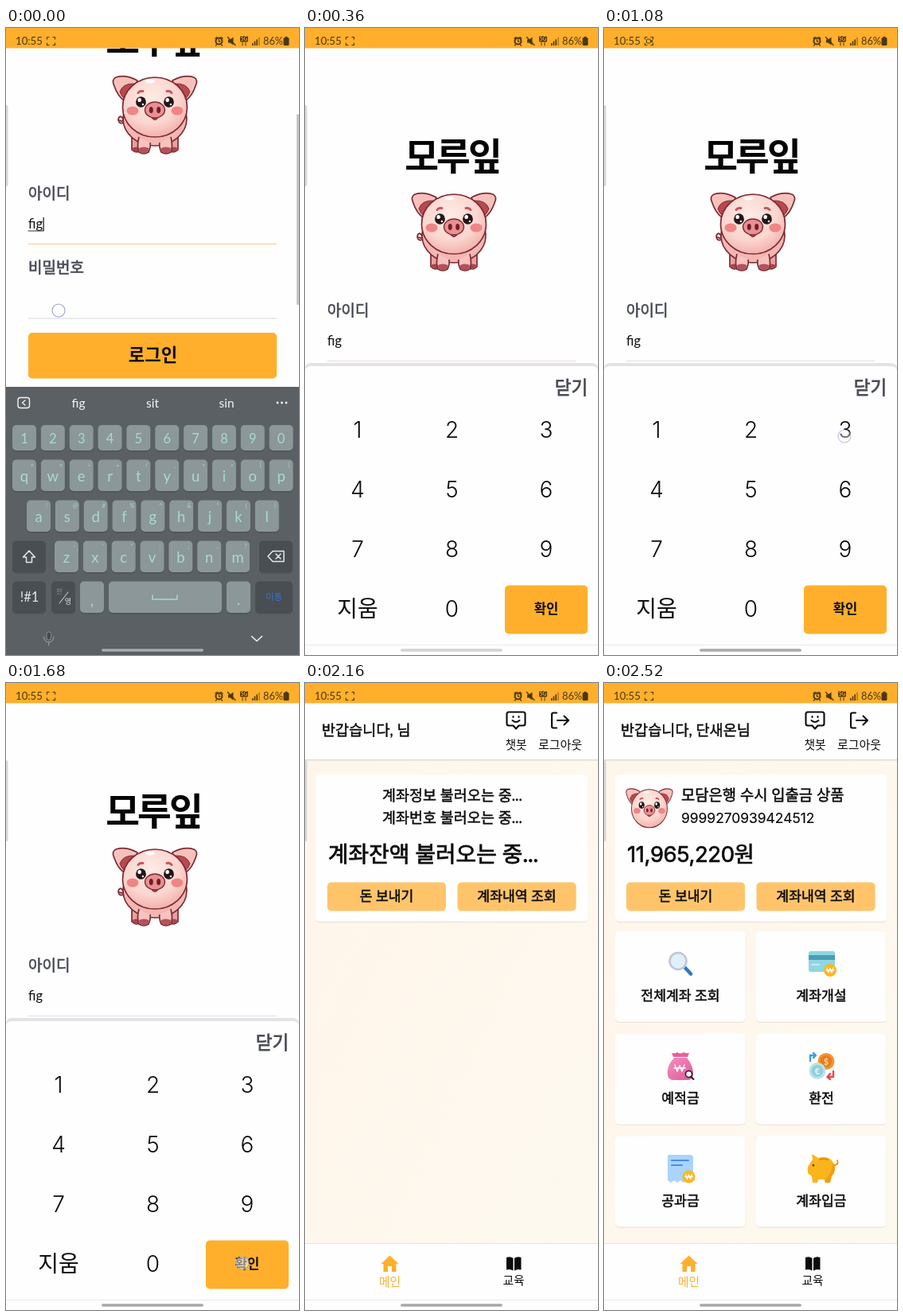
An HTML page for the animation above (2.64 s loop, 368 by 788 pixels).

```html
<!DOCTYPE html>
<html lang="ko">
<head>
<meta charset="utf-8">
<title>로그인</title>
<style>
html, body { margin: 0; width: 100%; height: 100%; overflow: hidden; background: #fefefe; }
svg { display: block; position: fixed; left: 0; top: 0; width: 368px; height: 788px; }
text { font-family: Lato, 'Noto Sans CJK KR', 'Noto Sans CJK JP', 'Noto Sans CJK', sans-serif; white-space: pre; }
.num { font-family: Inter, 'Noto Sans CJK KR', 'Noto Sans CJK JP', 'Noto Sans CJK', sans-serif; }
</style>
</head>
<body>
<svg id="stage" viewBox="0 0 368 788" xmlns="http://www.w3.org/2000/svg"></svg>
<script>
const ORANGE = '#ffaf2b', INK = '#0c0c0e', SLATE = '#4a4d57', MINT = '#a9d9d1';
const STEP = 120, COUNT = 22;

// Drawing helpers that return markup
const attrs = o => Object.entries(o).map(([k, v]) => ` ${k}="${v}"`).join('');
const el = (tag, o, body = '') => `<${tag}${attrs(o)}>${body}</${tag}>`;
const group = (id, body) => el('g', { id }, body);
const rect = (x, y, w, h, fill, rx = 0, o = {}) => el('rect', { x, y, width: w, height: h, rx, fill, ...o });
const oval = (cx, cy, rx, ry, fill, o = {}) => el('ellipse', { cx, cy, rx, ry, fill, ...o });
const path = (d, fill, o = {}) => el('path', { d, fill, ...o });
const line = (d, stroke, w = 1.5, o = {}) => path(d, 'none',
  { stroke, 'stroke-width': w, 'stroke-linecap': 'round', 'stroke-linejoin': 'round', ...o });
// y is the optical middle of the text
const text = (x, y, s, size, fill = INK, o = {}) => el('text',
  { x, y: y + size * 0.375, 'font-size': size, fill, 'text-anchor': 'middle', ...o }, s);
const left = { 'text-anchor': 'start' };
const bold = { 'font-weight': 700 };
const light = { 'font-weight': 300, class: 'num' };
const medium = (w = 0.45, c = INK) => ({ stroke: c, 'stroke-width': w });
const mirror = s => s + el('g', { transform: 'matrix(-1 0 0 1 374 0)' }, s);
const EDGE = { stroke: '#7c2a33', 'stroke-width': 1.7, 'stroke-linejoin': 'round' };

function pigFace() {
  const ear = path('M165 213Q150 205 138 209Q132 212 136 220Q140 232 148 238L160 228Z', '#f7c1bb', EDGE) +
    path('M162 217Q147 216 143 227Q145 233 149 236L162 226Z', '#b9484f', { ...EDGE, 'stroke-width': 1 });
  return mirror(ear) +
    oval(187, 246.5, 40.5, 37.5, 'url(#skin)', EDGE) +
    oval(181, 214, 6, 2.6, '#fff', { opacity: 0.85 }) +
    mirror(oval(159, 251, 7.5, 5.5, '#f08585') + line('M166 228.5Q168 225.5 172 226.5', '#c9555b', 3)) +
    [169.5, 204.5].map(x => oval(x, 240, 6.4, 6.8, '#241518') +
      oval(x - 1.8, 237.5, 2.3, 2.6, '#fff') + oval(x + 2.4, 243, 1.2, 1.2, '#fff')).join('') +
    path('M182 259Q187 266 192 259Z', '#b8434c', { stroke: '#7c2a33' }) +
    oval(187, 250, 12.5, 10, '#ea9093', { ...EDGE, 'stroke-width': 1.4 }) +
    mirror(oval(182.3, 250, 2.5, 4, '#6e2029'));
}

function pig() {
  const back = path('M158 282V300Q163 305 169 301V284Z', '#e9a19f', EDGE) +
    path('M158.5 298Q163 295 168.5 298V301Q163 304.5 158.5 300Z', '#a8474d');
  const front = path('M167 284Q164 296 167 303Q173 307 179 303Q182 297 181 291', '#f7c3be', EDGE) +
    path('M167 298Q173 295 179.5 298Q180 301 178.5 302.5Q173 306 167.5 302.5Z', '#b3525a');
  return line('M151 264Q142 270 141 262Q143 255 147 261Q147 266 143 263', '#7c2a33', 1.8) +
    mirror(back) + oval(187, 261, 40, 34, '#f4b6b2', EDGE) + mirror(front) + pigFace();
}

function login() {
  const label = { ...left, ...medium(0.7, SLATE) };
  return text(185, 161, '모루잎', 46.5, '#050505', { ...bold, 'letter-spacing': -3 }) + pig() +
    text(28, 355, '아이디', 19, SLATE, label) +
    text(28, 393, 'fig', 16.5, INK, left) +
    rect(28, 418, 312, 1, '#ddd', 0, { id: 'idLine' }) +
    text(28, 448, '비밀번호', 19, SLATE, label) +
    rect(28, 511.5, 312, 1, '#d3d9df') +
    rect(28, 530, 312, 57.5, ORANGE, 5) +
    text(184.5, 558, '로그인', 22.3, INK, bold);
}

function pad() {
  const keys = ['1', '2', '3', '4', '5', '6', '7', '8', '9', '지움', '0'];
  return path('M0 776V429Q0 421 8 421H360Q368 421 368 429V776Z', '#e3e3e7') +
    path('M0 776V431Q0 425 8 425H360Q368 425 368 431V776Z', '#fefefe') +
    text(355, 452, '닫기', 22.4, SLATE, { ...medium(0.8, SLATE), 'text-anchor': 'end' }) +
    keys.map((k, i) => text([66, 184.5, 303][i % 3], 504 + 75 * Math.floor(i / 3), k, 28, INK, light)).join('') +
    rect(251, 700.5, 104, 61, ORANGE, 5) + text(303, 730, '확인', 16.6, INK, bold);
}

function keyboard() {
  const W = '#f4f5f5';
  const key = (x, y, w, h, dark) => rect(x, y + 1.5, w, h, '#454b4e', 5, { opacity: 0.6 }) +
    rect(x, y, w, h, dark ? '#484e51' : '#8b9798', 5);
  const row = (chars, marks, x0, y, h) => [...chars].map((c, i) => {
    const x = x0 + i * 35.85, size = h > 35 ? 18.5 : 16.5;
    return key(x, y, 30, h) +
      el('text', { x: x + 15, y: y + h / 2 + size * 0.42, 'font-size': size, fill: MINT, 'text-anchor': 'middle' }, c) +
      (marks ? text(x + 25, y + 7, marks[i].replace('&', '&amp;').replace('<', '&lt;'), 7.5, MINT) : '');
  }).join('');
  const sparkle = (x, y, r) => path(`M${x} ${y - r}Q${x} ${y} ${x + r} ${y}Q${x} ${y} ${x} ${y + r}Q${x} ${y} ${x - r} ${y}Q${x} ${y} ${x} ${y - r}Z`, W, { stroke: W });
  const words = rect(15, 464.5, 14.5, 13, 'none', 3, { stroke: W, 'stroke-width': 1.4 }) +
    line('M24 468L20.5 471L24 474', W, 1.4) +
    ['fig', 'sit', 'sin'].map((s, i) => text(91 + 93 * i, 471, s, 15.5, W)).join('');
  const tools = sparkle(33, 469, 5) + sparkle(28, 474, 2.2) + sparkle(36, 475, 2.2) +
    oval(97, 470, 7, 7, 'none', { stroke: W, 'stroke-width': 1.4 }) +
    line('M94.5 468V468.3M99.5 468V468.3M93.5 472Q97 476 100.5 472', W, 1.4) +
    rect(157.5, 463.5, 11, 10, 'none', 2, { stroke: W, 'stroke-width': 1.3 }) +
    line('M155 467V475Q155 477 157 477H165', W, 1.3) + text(163, 468.5, 'A', 8, W, bold) +
    rect(221, 464, 12, 13, 'none', 2, { stroke: W, 'stroke-width': 1.4 }) + rect(224, 463, 6, 4, W, 1) +
    oval(292, 470, 6, 6, 'none', { stroke: W, 'stroke-width': 2, 'stroke-dasharray': '3.2 1.5' }) +
    oval(292, 470, 5, 5, 'none', { stroke: W }) + oval(292, 470, 2, 2, 'none', { stroke: W, 'stroke-width': 1.2 });
  return rect(0, 451, 368, 440, '#5a6063') +
    group('words', words) + group('tools', tools) +
    [341, 346.5, 352].map(x => oval(x, 471, 1.4, 1.4, W)).join('') +
    row('1234567890', '', 8, 499, 32) +
    row('qwertyuiop', '+×÷=/_<>[]', 8, 542.5, 39.5) +
    row('asdfghjkl', '!@#%^&*()', 26, 593.5, 39.5) +
    row('zxcvbnm', '-\'":;,?', 61, 644.5, 39.5) +
    key(8, 644.5, 42, 39.5, 1) + line('M29 657L36.5 665H32.5V671.5H25.5V665H21.5Z', '#e4e9e9', 1.5) +
    key(318, 644.5, 42, 39.5, 1) + line('M329 664L335 657.5H349V670.5H335ZM339 661L345 667M345 661L339 667', '#e4e9e9', 1.5) +
    key(8, 695.5, 42, 39.5, 1) + text(29.5, 715, '!#1', 16.5, '#e4e9e9') +
    key(57, 695.5, 30, 39.5, 1) + text(67, 708, '한', 8.5, '#899293') +
    line('M67 723L78 709', '#dfe5e5', 1) + text(78, 721, '영', 9, '#dfe5e5') +
    key(93, 695.5, 30, 39.5) + text(108, 719, ',', 19, MINT) +
    key(129, 695.5, 142, 39.5) + line('M184 713V718H215V713', MINT, 1.5) +
    key(277, 695.5, 30, 39.5) + text(292, 718, '.', 19, MINT) +
    key(313, 695.5, 47, 39.5, 1) + text(336.5, 715, '이동', 11.5, '#3f72c4') +
    rect(51, 759, 5.5, 10, '#42484b', 2.8, { stroke: '#9aa1a3', 'stroke-width': 0.8 }) +
    line('M47.5 765Q48 772 53.7 772T60 765M53.7 772V776', '#9aa1a3', 1) +
    line('M308.5 764.5L315 770.5L321.5 764.5', '#f2f3f3', 1.6);
}

const won = (x, y, s) => line(
  `M${x - s} ${y - s * 0.7}L${x - s / 2} ${y + s * 0.7}L${x} ${y - s * 0.6}L${x + s / 2} ${y + s * 0.7}L${x + s} ${y - s * 0.7}M${x - s * 1.2} ${y}H${x + s * 1.2}`, '#fff', 1.3);

function icons() {
  const coin = (x, y, r) => oval(x, y, r, r, '#f8b823') + won(x, y, r * 0.5);
  return line('M102 358L109 365.5', '#2f77c8', 4.5) +
    oval(93, 349.5, 10.5, 10.5, '#dff0fb', { stroke: '#bfc6d6', 'stroke-width': 2.6 }) +
    // card
    rect(257, 337, 33, 26, '#8fd6e2', 2.5) + rect(257, 342, 33, 6, '#4a9db4') +
    line('M261 354H270', '#d9f3f7', 1.6) + coin(284, 361, 8) +
    // money bag
    path('M88 471Q78 482 80 493Q81 499 88 499H104Q111 499 112 493Q113 482 104 471Z', 'url(#bag)') +
    path('M87 470L85 465Q90 466 92 464Q96 467 100 464Q103 466 107 465L105 470Z', '#e85f9b') +
    won(95, 484, 6) + oval(106.5, 491.5, 4, 4, '#fff', { stroke: '#222', 'stroke-width': 1.6 }) +
    line('M109.5 495L112.5 498', '#222', 2) +
    // exchange
    oval(279, 475.5, 10.5, 10.5, '#f39532') + oval(279, 475.5, 7.5, 7.5, '#e57d1c') +
    text(279, 475.5, '$', 11, '#ffd99b', bold) +
    oval(268, 487.5, 10.5, 10.5, '#b9e4ea') + oval(268, 487.5, 7.5, 7.5, '#93cfda') +
    text(268, 487.5, '€', 11, '#e6f8fa', bold) +
    line('M259 475V468H265M263 465L266 468L263 471', '#3d9fe0', 2.4) +
    line('M288 488V495H281M284 491L280.5 495L284 498', '#e5484d', 2.4) +
    // receipt
    path('M80 594Q80 593 82 593H108Q112 593 112 597V625L108 628L104 625L100 628L96 625L92 628L88 625L84 628L80 625Z', '#a9d4fb') +
    line('M85 600H106M85 606H98', '#4d8fe0', 2) + coin(106.5, 620.5, 8) +
    // piggy bank
    path('M262 599L261 592L269 597Q282 593 288 603Q293 613 285 620L284 628H278L277 624H269L268 628H262L261 620L256 616V608Q259 603 262 599Z', '#fbb41c') +
    path('M286 620L284 628H278L277 624Q284 621 288 603Q293 613 286 620Z', '#f29d12') +
    line('M289 606Q295 606 293 600', '#e8930c', 1.8) + oval(263, 606, 1.3, 1.6, '#5b3a08') +
    line('M271 599Q276 597 281 599', '#d98408', 1.6);
}

function home() {
  const card = (x, y, w, h) => rect(x, y + 1, w, h, '#e9dfd2', 5) + rect(x, y, w, h, '#fefefe', 5);
  const labels = ['전체계좌 조회', '계좌개설', '예적금', '환전', '공과금', '계좌입금'];
  const grid = labels.map((s, i) => {
    const x = 177 * (i % 2), y = 312 + 128.7 * Math.floor(i / 2);
    return card(14 + x, y, 163.5, 114) + text(96 + x, y + 81, s, 17.2, INK, medium(0.5));
  }).join('');
  const button = (x, s) => rect(x, 250.5, 149, 36, '#ffc46a', 5) + text(x + 74.5, 268, s, 17.2, INK, medium(0.5));
  const row = (y, s, size, w, o) => text(y > 200 ? 29 : 97, y, s, size, INK, { ...left, ...medium(w), ...o });
  const wait = row(141, '계좌정보 불러오는 중...', 18.5) + row(169, '계좌번호 불러오는 중...', 18.5) +
    row(215, '계좌잔액 불러오는 중...', 27.8, 0.8);
  const done = el('g', { transform: 'translate(-46.8 0) scale(.555 .64)' }, pigFace()) +
    row(141, '모담은행 수시 입출금 상품', 18.8) +
    row(169, '9999270939424512', 17.4, 0.2, { class: 'num' }) +
    row(215, '11,965,220원', 27.5, 0.7, { class: 'num', 'letter-spacing': -0.4 });
  return rect(0, 26, 368, 750, 'url(#cream)') +
    rect(0, 25, 368, 71, '#fefefe') + rect(0, 96, 368, 1.5, '#dfdcd8') +
    text(21, 59, '반갑습니다, 님', 18.6, INK, { ...left, ...medium(), id: 'hello' }) +
    line('M256 36.5H274Q276.5 36.5 276.5 39V51Q276.5 53.5 274 53.5H268.5L265 57.5L261.5 53.5H256Q253.5 53.5 253.5 51V39Q253.5 36.5 256 36.5Z', INK, 2.1) +
    line('M261.5 42V43M268.5 42V43M260.5 47Q265 51 269.5 47', INK, 2) +
    text(265, 77, '챗봇', 14.8) +
    line('M316 37.5H312Q310 37.5 310 39.5V54.5Q310 56.5 312 56.5H316M317 47H330.5M325.5 41.5L331 47L325.5 52.5', INK, 2.1) +
    text(320.5, 77, '로그아웃', 15) +
    card(14, 115, 341, 185) + button(28, '돈 보내기') + button(191.5, '계좌내역 조회') +
    group('wait', wait) + group('done', done) + group('grid', grid) + group('icons', icons()) +
    rect(0, 704, 368, 72, '#fefefe') + rect(0, 704, 368, 1, '#e6e4e2') +
    path('M106.5 719.5L117.5 730H114.5V740H109V733H104V740H98.5V730H95.5Z', ORANGE) +
    text(106.5, 752, '메인', 14.8, ORANGE) +
    path('M253 722Q258 720 261.5 723V738.5Q258 736 253 737.5ZM271.5 722Q266.5 720 263 723V738.5Q266.5 736 271.5 737.5Z', INK) +
    text(262, 750, '교육', 14.8);
}

function status() {
  const C = '#4c3812';
  return rect(0, 0, 368, 25.4, ORANGE) +
    text(12, 16.5, '10:55', 13.2, C, left) +
    line('M51.5 14V11.5H54M59 11.5H61.5V14M61.5 19V21.5H59M54 21.5H51.5V19', C, 1.1) +
    group('cam', rect(53.5, 14, 5, 5, 'none', 1, { stroke: C }) + path('M59 16L61 14.5V18.5L59 17Z', C)) +
    oval(267.5, 16.5, 4, 4, 'none', { stroke: C, 'stroke-width': 2 }) +
    line('M267.5 14.5V17H269M263 13L265 11.5M272 13L270 11.5M264.5 21L263.5 22M270.5 21L271.5 22', C, 1.3) +
    path('M279 14.5H281.5L285.5 11.5V21.5L281.5 18.5H279Z', C) + line('M278.5 11.5L288 21.5', C, 1.3) +
    rect(294, 10, 10, 7.5, C, 1.5) + text(299, 13.8, '5G', 6.5, ORANGE, bold) +
    line('M297 22V18.5M301 18.5V22', C, 1) +
    [0, 1, 2, 3].map(i => rect(309 + i * 2.7, 19 - i * 2.4, 1.6, 3 + i * 2.4, C, 0.5, { opacity: i > 2 ? 0.45 : 1 })).join('') +
    text(323, 16.5, '86%', 12.8, C, left) +
    rect(348.5, 12, 7, 10, C, 1.5) + rect(350.5, 10.8, 3, 1.5, C);
}

const stops = list => list.map(([o, c]) => `<stop offset="${o}" stop-color="${c}"/>`).join('');
const stage = document.getElementById('stage');
stage.innerHTML = `<defs>
  <radialGradient id="skin" cx=".45" cy=".35" r=".7">${stops([[0, '#fdebe5'], [0.6, '#fbd6cf'], [1, '#f0aaa6']])}</radialGradient>
  <linearGradient id="bag" x2="1" y2="1">${stops([[0, '#f58fbb'], [1, '#dd5a9c']])}</linearGradient>
  <linearGradient id="cream" x2="1" y2="1">${stops([[0, '#fff5ea'], [1, '#fdf9ef']])}</linearGradient>
</defs>` +
  rect(0, 0, 368, 788, '#fefefe') +
  group('login', login()) +
  group('entry', line('M28 255H47', '#333', 1) + rect(46.5, 238, 1.2, 17, '#111') + rect(365, 108, 3, 240, '#c3c3c5', 1.5)) +
  group('pad', pad()) + group('home', home()) +
  rect(0, 775, 368, 1, '#e9e9e9') +
  group('keys', keyboard()) +
  rect(-3, 97, 5.6, 102, '#d9d7d5', 2.5) + status() +
  rect(120, 780.2, 128, 3.6, '#aaa', 1.8, { id: 'bar' }) +
  oval(0, 0, 8, 8, '#fff', { id: 'touch', 'fill-opacity': 0.55, stroke: '#9aa3cc', 'stroke-width': 1.1 });

const $ = id => document.getElementById(id);
const show = (id, on) => { $(id).style.display = on ? '' : 'none'; };

// step: x, y, opacity
const taps = {
  0: [66, 355, 1], 1: [67, 352, 0.9], 2: [69, 346, 0.45], 5: [184, 510, 0.8], 7: [66, 585, 0.8],
  9: [302, 513, 0.65], 11: [184, 660, 0.8], 14: [297, 729, 0.9], 16: [184, 560, 0.9]
};
const camOn = [2, 5, 7, 9, 12, 16, 20];

function draw(n) {
  const typing = n < 2, keys = n < 3, main = n >= 17, loaded = n === COUNT - 1;
  show('login', !main);
  $('login').setAttribute('transform', `translate(0 ${typing ? -147 : 0})`);
  $('idLine').setAttribute('fill', typing ? '#f5c98c' : n < 4 ? '#ecdcd8' : '#dedede');
  show('entry', typing);
  show('pad', n >= 2 && n < 15);
  show('keys', keys);
  $('keys').setAttribute('transform', `translate(0 ${typing ? 0 : 103})`);
  show('words', n === 0);
  show('tools', n > 0);
  show('home', main);
  show('wait', !loaded);
  show('done', loaded);
  show('icons', loaded);
  show('grid', n >= 20);
  $('hello').textContent = n >= 20 ? '반갑습니다, 단새온님' : '반갑습니다, 님';
  show('cam', camOn.includes(n));
  $('bar').setAttribute('fill', keys ? '#a7acae' : n === 3 ? '#d2d2d2' : '#a9a9a9');
  const tap = taps[n];
  show('touch', tap);
  if (tap) {
    $('touch').setAttribute('transform', `translate(${tap[0]} ${tap[1]})`);
    $('touch').setAttribute('opacity', tap[2]);
  }
}

const start = performance.now();
let last = -1;
function tick() {
  const n = Math.floor((performance.now() - start) / STEP) % COUNT;
  if (n !== last) draw(last = n);
  requestAnimationFrame(tick);
}
tick();
</script>
</body>
</html>
```
